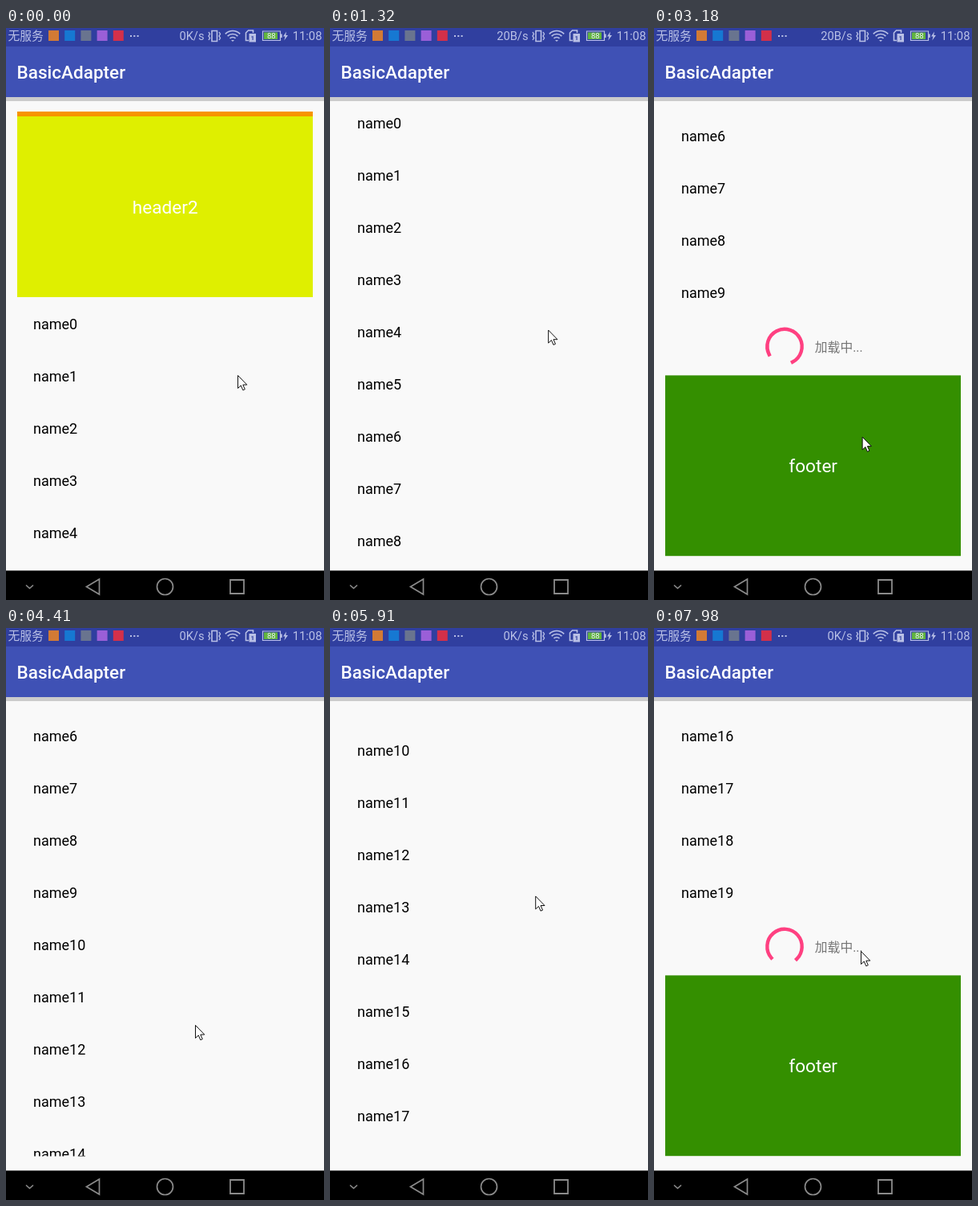
Write an HTML page with a canvas that moves like this. It is 397 px wide and 712 px high and loops after 8000 ms.

```html
<!DOCTYPE html>
<html>
<head>
<meta charset="utf-8">
<style>
html, body { margin: 0; height: 100%; overflow: hidden; background: #f9f9f9; }
canvas { display: block; }
</style>
</head>
<body>
<canvas id="stage" width="397" height="712"></canvas>
<script>
const c = document.getElementById('stage').getContext('2d');
const LOOP = 8000, LOADED = 3600, ROW = 65, TOP = 104, BOTTOM = 657.5;
const FONT = 'Roboto, "Noto Sans CJK SC", "Noto Sans CJK", sans-serif';
const INK = '#b9c0e6';

// Swipes: begin, end, distance
const swipes = [[727, 2098, 624], [4650, 5750, 242], [6305, 7600, 408]];
// Pointer stops: time, x, y
const stops = [
  [0, 289, 432], [900, 264, 364], [1830, 283, 391], [2900, 262, 510], [4410, 236, 494],
  [5700, 258, 343], [6600, 245, 274], [7400, 258, 260], [7980, 258, 402]
];

const clamp = u => Math.min(1, Math.max(0, u));
const smooth = u => (u = clamp(u), u * u * (3 - 2 * u));
const scrollAt = t => swipes.reduce((sum, [a, b, d]) => sum + d * smooth((t - a) / (b - a)), 0);

function pointerAt(t) {
  const next = stops.findIndex(s => s[0] > t);
  if (next < 0) return stops[stops.length - 1].slice(1);
  const [t0, x0, y0] = stops[next - 1], [t1, x1, y1] = stops[next];
  const u = smooth((t - t0) / (t1 - t0));
  return [x0 + (x1 - x0) * u, y0 + (y1 - y0) * u];
}

// cubic-bezier(.4, 0, .2, 1), solved by bisection
function ease(x) {
  x = clamp(x);
  let lo = 0, hi = 1, u;
  for (let i = 0; i < 16; i++) {
    u = (lo + hi) / 2;
    if (1.2 * u * (1 - u) ** 2 + 0.6 * u * u * (1 - u) + u ** 3 < x) lo = u; else hi = u;
  }
  return smooth(u);
}

function rect(x, y, w, h, color) {
  c.fillStyle = color;
  c.fillRect(x, y, w, h);
}

function text(s, x, y, size, color, align = 'left', weight = 400) {
  c.font = `${weight} ${size}px ${FONT}`;
  c.textAlign = align;
  c.fillStyle = color;
  c.fillText(s, x, y);
}

function stroke(path, color, width) {
  c.strokeStyle = color;
  c.lineWidth = width;
  c.stroke(new Path2D(path));
}

function fill(path, color) {
  c.fillStyle = color;
  c.fill(new Path2D(path));
}

function arc(x, y, r, from, to, color, width, cap = 'butt') {
  c.beginPath();
  c.arc(x, y, r, from * Math.PI / 180, to * Math.PI / 180);
  c.strokeStyle = color;
  c.lineWidth = width;
  c.lineCap = cap;
  c.stroke();
  c.lineCap = 'butt';
}

function block(y, color, label) {
  rect(14, y, 369, 225, color);
  text(label, 198.7, y + 121, 22.6, '#fff', 'center');
}

function spinner(x, y, t) {
  const [start, base] = t < LOADED ? [1163, -22] : [7420, 131];
  const p = (t - start) / 1333, f = p - Math.floor(p);
  const turn = base - 90 + 144 * p + 90 * f;
  arc(x, y, 21.7, turn + 270 * ease(2 * f - 1), turn + 270 * ease(2 * f) + 0.5, '#ff4081', 4.4, 'square');
}

function list(t) {
  const count = t < LOADED ? 10 : 20, end = 335 + count * ROW;
  c.save();
  c.beginPath();
  c.rect(14, TOP, 369, BOTTOM - TOP);
  c.clip();
  c.translate(0, -scrollAt(t));
  block(-115, '#f79400', '');
  block(110, '#dfef00', 'header2');
  for (let i = 0; i < count; i++) text('name' + i, 34, 374.5 + i * ROW, 18, '#000');
  spinner(163, end + 35.5, t);
  text('加载中...', 200.8, end + 41.5, 15.8, '#757575');
  block(end + 71.4, '#348f00', 'footer');
  c.restore();
}

function statusBar(t) {
  rect(0, 0, 397, 23, '#303f9f');
  text('无服务', 2.5, 15, 14.8, INK);
  ['#d27a35', '#1678d2', '#69748f', '#9a5fd8', '#d3304a'].forEach((color, i) =>
    rect(53 + i * 20.2, 3, 13, 13, color));
  for (let i = 0; i < 3; i++) rect(155 + i * 4.3, 9, 2, 2, INK);
  text(t > 1300 && t < 3300 ? '20B/s' : '0K/s', 247.5, 15, 14.7, INK, 'right');
  // vibrate
  stroke('M257 3.5h6.5v13h-6.5z', INK, 1.6);
  for (const x of [253, 266]) stroke(`M${x} 5l1.5 2.5-1.5 2.5 1.5 2.5-1.5 2.5`, INK, 1.4);
  // wifi
  for (let r = 5; r < 15; r += 4) arc(283, 16.5, r, 225, 315, INK, 1.7);
  fill('M281 15h4l-2 2z', INK);
  // sim
  stroke('M303 15.5h-3.5V6l3-3h6v3', INK, 1.6);
  rect(303.5, 7, 8.5, 10.5, INK);
  text('1', 307.7, 15.3, 8, '#303f9f', 'center', 700);
  // battery
  stroke('M320.5 4h22v11.500h-22z', INK, 1.2);
  rect(322, 5.5, 17, 8.5, '#62b53f');
  rect(343, 7.5, 1.7, 4.5, INK);
  text('88', 331.3, 13.4, 9.5, '#eef', 'center');
  fill('M350 4.5l-4 6h2.5l-1.2 5 4.7-6.5h-2.7z', INK);
  text('11:08', 394.5, 15, 14.8, INK, 'right');
}

function navBar() {
  const ink = '#8b8b8b';
  rect(0, 675.4, 397, 37, '#000');
  stroke('M25 693.5l4.5 4 4.5-4', ink, 1.6);
  stroke('M116.5 686v19l-16-9.5z', ink, 1.7);
  arc(198.5, 695.5, 10, 0, 360, ink, 1.7);
  stroke('M280 687h17v17h-17z', ink, 1.8);
}

function pointer(t) {
  const [x, y] = pointerAt(t);
  const arrow = 'M0 0v16l3.8-3.500 2.500 5.800 2.500-1.100-2.500-5.600h5z';
  c.save();
  c.translate(x + 0.5, y + 0.5);
  fill(arrow, '#fff');
  stroke(arrow, '#111', 1);
  c.restore();
}

function draw(t) {
  rect(0, 0, 397, 712, '#f9f9f9');
  list(t);
  rect(0, 86, 397, 5, '#cbcbcb');
  rect(0, 23, 397, 63, '#3f51b5');
  text('BasicAdapter', 13.5, 63.3, 22.5, '#fff', 'left', 500);
  statusBar(t);
  navBar();
  pointer(t);
}

const begin = performance.now();
(function frame() {
  draw((performance.now() - begin) % LOOP);
  requestAnimationFrame(frame);
})();
</script>
</body>
</html>
```
